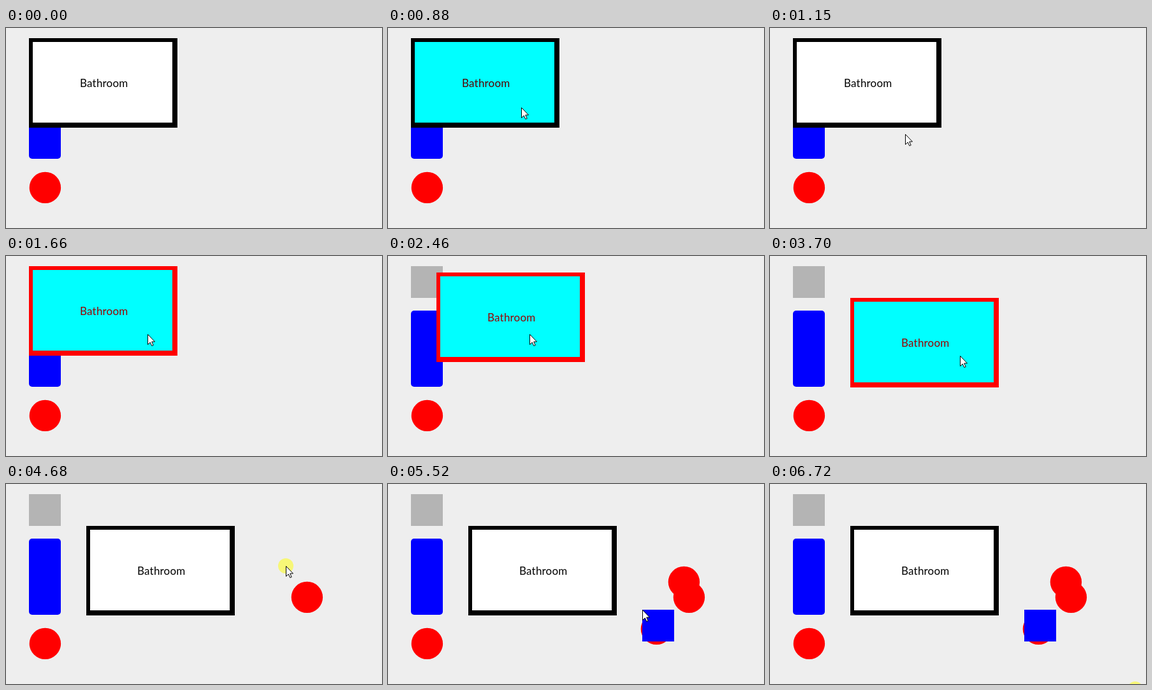
An HTML page for the animation above (6.77 s loop, 590 by 315 pixels).

```html
<!DOCTYPE html>
<html lang="en">
<head>
<meta charset="utf-8">
<title>Room planner</title>
<style>
  html, body { margin: 0; width: 100%; height: 100%; overflow: hidden; background: #eee; }
  svg { display: block; width: 590px; height: 315px; }
  .edge { fill: #000; }
  .floor { fill: #fff; }
  .label { font: 17px Lato, Carlito, "Open Sans", sans-serif; letter-spacing: .2px; fill: #000; }
  .hover .floor { fill: #0ff; }
  .hover .label { fill: #500; }
  .selected .edge { fill: #f00; }
  .selected .label { fill: #900; }
  .red { fill: #f00; }
  .blue { fill: #00f; }
</style>
</head>
<body>
<svg viewBox="0 0 590 315">
  <rect x="36" y="16" width="50" height="50" fill="#b4b4b4"/>
  <rect class="blue" x="36" y="86" width="50" height="120" rx="5"/>
  <circle class="red" cx="61.4" cy="251.4" r="24.7"/>

  <g id="room">
    <rect class="edge" width="233" height="141"/>
    <rect class="floor" x="6" y="6" width="219" height="127"/>
    <text class="label" x="80" y="77">Bathroom</text>
  </g>

  <g id="placed">
    <circle class="red" cx="472.4" cy="178.4" r="24.7" data-at="4220"/>
    <circle class="red" cx="464.4" cy="154.4" r="24.7" data-at="4770"/>
    <circle class="red" cx="421.4" cy="228.4" r="24.7" data-at="4970"/>
    <rect class="blue" x="399" y="198" width="50" height="50" data-at="5520"/>
  </g>

  <g id="pointer">
    <circle id="glow" r="12" fill="#ff0" opacity=".5"/>
    <path d="M.5 .5V16.5L4.2 13L6.8 18.5L9.2 17.5L6.7 12H11.5Z" fill="#fff" stroke="#000"/>
  </g>
</svg>
<script>
const LOOP = 6770;
const $ = id => document.getElementById(id);
const room = $('room'), pointer = $('pointer'), glow = $('glow');
const shapes = [...$('placed').children];

// Pointer track: each stop holds until the next one
const track = [];
const jump = (t, x, y) => track.push({ t, x, y });
const hide = t => jump(t, -99, -99);
function glide(start, end, steps, x, y) {
  const from = track[track.length - 1];
  for (let i = 1; i <= steps; i++) {
    const k = i / steps;
    jump(start + (end - start) * (i - 1) / (steps - 1),
      Math.round(from.x + (x - from.x) * k),
      Math.round(from.y + (y - from.y) * k));
  }
}

hide(0);
jump(180, 379, 277);
glide(220, 260, 2, 313, 232);
glide(410, 740, 6, 210, 118);
jump(880, 209, 125);
glide(930, 960, 2, 206, 197);
glide(1100, 1300, 5, 222, 123);
jump(3660, 258, 140);
jump(3700, 298, 157);
glide(3750, 3940, 5, 447, 153);
glide(4550, 4590, 2, 439, 129);
glide(4800, 4880, 3, 396, 203);
jump(5150, 399, 198);
jump(5710, 412, 184);
hide(5760);
jump(6170, 529, 164);
jump(6220, 510, 232);
jump(6370, 524, 260);
jump(6410, 544, 298);
jump(6450, 573, 323);

const presses = [[1570, 1660], [4130, 4220], [4680, 4770], [4920, 4970], [5470, 5520], [6720, LOOP]];

// Arrow keys nudge the selected room by 10 px
const keys = 'RRRRDDDRRRRRDD';
const keyTimes = [2090, 2180, 2280, 2370, 2460, 2590, 2680,
  2780, 2870, 2970, 3060, 3150, 3250, 3340];

const within = (t, a, b) => t >= a && t < b;

function draw(t) {
  let x = 36, y = 16;
  keyTimes.forEach((at, i) => {
    if (t < at) return;
    if (keys[i] === 'R') x += 10; else y += 10;
  });
  const p = track.filter(s => s.t <= t).pop();
  const hover = within(p.x, x, x + 233) && within(p.y, y, y + 141);

  room.setAttribute('transform', `translate(${x} ${y})`);
  room.classList.toggle('hover', hover);
  room.classList.toggle('selected', within(t, 1660, 4220));
  pointer.setAttribute('transform', `translate(${p.x} ${p.y})`);
  glow.style.display = presses.some(([a, b]) => within(t, a, b)) ? '' : 'none';
  for (const s of shapes) s.style.display = t >= +s.dataset.at ? '' : 'none';
}

const begin = performance.now();
function tick() {
  draw((performance.now() - begin) % LOOP);
  requestAnimationFrame(tick);
}
tick();
</script>
</body>
</html>
```
